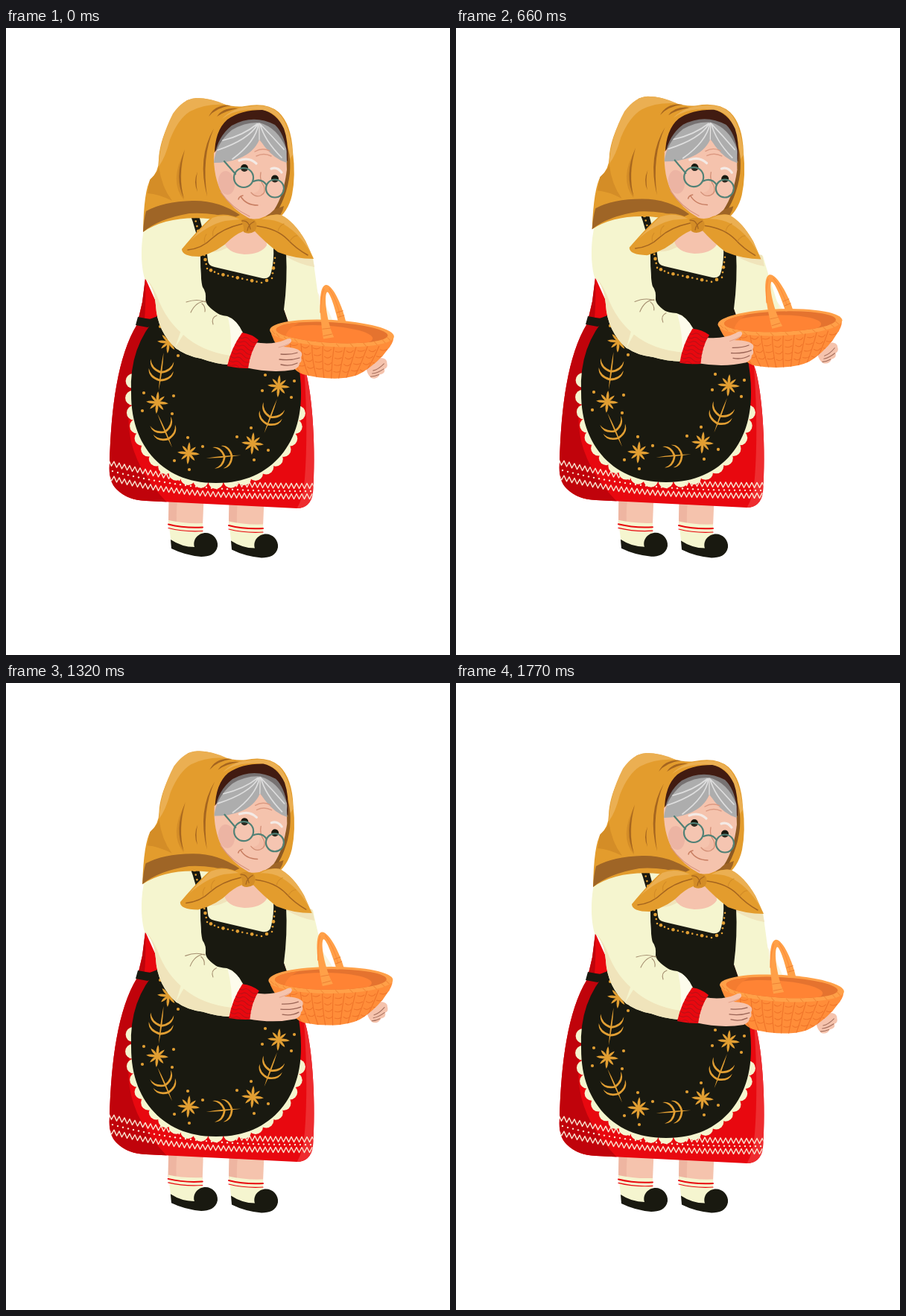
An HTML page with a canvas that plays this animation: 596x842 px, repeating every 1800 ms.

```html
<!DOCTYPE html>
<html lang="en">
<head>
<meta charset="utf-8">
<title>Grandmother with a basket</title>
<style>
html, body { margin: 0; width: 100%; height: 100%; overflow: hidden; background: #fff; }
canvas { display: block; width: 596px; height: 842px; }
</style>
</head>
<body>
<canvas id="stage" width="596" height="842"></canvas>
<script>
const ctx = document.getElementById('stage').getContext('2d');
const LOOP = 1800, STEP = 30, TAU = Math.PI * 2;
const C = {
  scarf: '#e39c2d', scarfLight: '#ebaf52', scarfShade: '#d48d27', brown: '#9f6526', fold: '#a5651f',
  skin: '#f5c3ad', skinShade: '#eeb5a1', cream: '#f5f5cf', creamShade: '#f0e4bb',
  black: '#191910', red: '#e8080f', darkRed: '#c0030b', gold: '#e29f33',
  wicker: '#ff8d39', rim: '#ffa048', weave: '#f0752a'
};
const cache = new Map();
function path(d) {
  if (!cache.has(d)) cache.set(d, new Path2D(d));
  return cache.get(d);
}
function fill(color, d) {
  ctx.fillStyle = color;
  ctx.fill(path(d));
}
function line(color, width, d) {
  ctx.strokeStyle = color;
  ctx.lineWidth = width;
  ctx.stroke(path(d));
}
function oval(color, x, y, rx, ry = rx, turn = 0) {
  ctx.fillStyle = color;
  ctx.beginPath();
  ctx.ellipse(x, y, rx, ry, turn, 0, TAU);
  ctx.fill();
}
function group(x, y, angle, draw, px = 0, py = 0) {
  ctx.save();
  ctx.translate(x + px, y + py);
  ctx.rotate(angle);
  ctx.translate(-px, -py);
  draw();
  ctx.restore();
}
function clip(d, draw) {
  ctx.save();
  ctx.clip(path(d));
  draw();
  ctx.restore();
}
const wave = (t, period) => (1 - Math.cos(TAU * t / period)) / 2;

function leg() {
  fill(C.skin, 'M219 620 H266 L264 668 L218 664 Z');
  fill(C.skinShade, 'M219 620 H232 Q228 645 229 664 L218 664 Z');
  fill(C.cream, 'M218 661 Q240 666 264 665 L264 690 L254 700 L222 694 Z');
  line(C.red, 2, 'M218 666.5 Q240 672 264 670.5');
  line(C.red, 1.2, 'M218 671.5 Q240 677 264 675.5');
  fill(C.black, 'M221 687 Q236 697 253 697 C250 687 258 678 268 678 C277 678 285 686 284 696 C282 707 272 710 262 710 Q240 708 222 699 Z');
}

const SKIRT = 'M187 336 L183 368 L176 398 C150 440 141 510 139 585 Q137 609 149 620 Q163 634 188 635 L390 645 Q409 645 412 624 C416 570 412 495 402 460 L372 376 L205 376 Z';

function zigzag(base, rise, power) {
  ctx.beginPath();
  for (let i = 0; i <= 79; i++) {
    const x = 138 + i * 3.5;
    const u = Math.max(0, 413 - x) / 274;
    ctx.lineTo(x, base - rise * u ** power + (i % 2 ? 3.5 : -3.5));
  }
  ctx.strokeStyle = '#f9e6d2';
  ctx.lineWidth = 1.4;
  ctx.stroke();
}

function skirt() {
  fill(C.red, SKIRT);
  clip(SKIRT, () => {
    fill(C.darkRed, 'M187 336 Q188 370 186 390 L210 390 L176 460 Q160 500 166 545 Q173 592 216 637 H130 V380 Z');
    fill('#ee2c2f', 'M400 455 Q406 540 401 605 Q399 632 390 646 H420 V455 Z');
    zigzag(615, 31, 2.5);
    zigzag(629, 25, 3);
    for (let x = 143; x < 412; x += 7) {
      const u = (413 - x) / 274;
      oval('#f9e6d2', x, 622 - 28 * u ** 2.7, 1.2);
    }
  });
  fill(C.black, 'M177 388 L193 391 L206 386 L210 394 L190 402 L174 399 Z');
}

// Rounded hem of the apron, a in radians
function hem(a, grow = 0) {
  const bend = v => Math.sign(v) * Math.abs(v) ** 0.91;
  return [282 + (114 + grow) * bend(Math.cos(a)), 490 + (121 + grow) * bend(Math.sin(a))];
}

function star(x, y) {
  for (let i = 0; i < 8; i++) {
    group(x, y, 0.08 + i * TAU / 8, () =>
      fill(C.gold, i % 2 ? 'M0 -1 Q8 -2.6 13 0 Q8 2.6 0 1 Z' : 'M0 -1 Q9 -3.2 15 0 Q9 3.2 0 1 Z'));
  }
}

function branch(x, y, angle, size) {
  group(x, y, angle, () => {
    ctx.scale(size, size);
    fill(C.gold, 'M0 26 Q-1.6 0 0.5 -26 Q2.6 0 0 26');
    for (const side of [-1, 1]) {
      ctx.save();
      ctx.scale(side, 1);
      fill(C.gold, 'M0 0 Q13 -3 16 -15 Q17 -1 0 3 Z M0 11 Q13 9 17 -2 Q17 11 0 14 Z');
      ctx.restore();
    }
  });
}

function beads(points) {
  let n = 0;
  for (let i = 1; i < points.length; i++) {
    const [ax, ay] = points[i - 1], [bx, by] = points[i];
    const count = Math.max(1, Math.round(Math.hypot(bx - ax, by - ay) / 6.5));
    for (let k = 0; k < count; k++) {
      const u = k / count;
      oval(C.gold, ax + (bx - ax) * u, ay + (by - ay) * u, n++ % 3 ? 1.3 : 2.3);
    }
  }
}

function dress() {
  for (let i = 0; i < 21; i++) {
    const [x, y] = hem(0.2 + i * (Math.PI - 0.09) / 20, -2);
    oval(C.cream, x, y, 10);
  }
  ctx.fillStyle = C.black;
  ctx.beginPath();
  ctx.moveTo(246, 249);
  ctx.lineTo(340, 270);
  ctx.lineTo(376, 302);
  ctx.quadraticCurveTo(378, 340, 373, 378);
  ctx.quadraticCurveTo(396, 442, 396, 490);
  for (let i = 0; i <= 60; i++) ctx.lineTo(...hem(Math.PI * i / 60));
  ctx.quadraticCurveTo(165, 428, 204, 386);
  ctx.lineTo(262, 350);
  ctx.quadraticCurveTo(262, 290, 246, 249);
  ctx.fill();

  star(218, 422);
  star(203, 503);
  star(245, 571);
  star(331, 558);
  star(366, 481);
  branch(208, 461, 0.12, 0.98);
  branch(213, 541, -0.42, 0.95);
  branch(292, 576, -1.67, 0.9);
  branch(355, 521, 0.35, 0.95);
  for (const [x, y] of [[207, 401], [231, 440], [185, 490], [225, 494], [183, 514], [223, 518],
    [244, 550], [264, 562], [226, 581], [246, 593], [310, 549], [329, 537], [352, 567],
    [333, 580], [348, 466], [387, 474], [383, 496], [344, 487]]) oval(C.gold, x, y, 2.1);

  fill(C.cream, 'M258 248 Q268 284 271 312 Q271 319 280 321 L344 336 Q354 338 356 328 Q360 312 359 294 L345 252 Z');
  fill(C.creamShade, 'M268 300 Q284 304 302 292 L318 272 L262 270 Z');
  fill(C.skin, 'M304 245 L348 250 L350 292 Q342 304 320 304 Q296 302 293 287 Z');
  beads([[253, 253], [265, 299], [270, 323], [285, 330], [343, 342], [357, 336], [362, 302]]);
}

function rearSleeve(p) {
  const x = 425 + 13 * p, y = 400 - 20 * p;
  fill('#faf5df', `M415 350 Q430 ${372 - 8 * p} 440 ${396 - 18 * p} L415 ${400 - 18 * p} Z`);
  fill(C.cream, `M360 298 L412 307 Q${417 + 2 * p} ${348 - 20 * p} ${x} ${y} L374 402 Z`);
  fill(C.creamShade, 'M374 298 L411 306 L414 321 Q395 318 376 307 Z');
}

function upperSleeve() {
  fill(C.cream, 'M187 262 C180 290 181 318 186 336 Q199 348 201 372 Q203 408 229 431 L258 440 L292 388 Q269 375 268 366 Q269 354 264 348 Q261 340 261 304 Q256 272 246 247 Z');
  fill(C.creamShade, 'M187 336 Q194 341 202 358 Q215 396 244 416 L260 440 L229 431 Q203 408 201 372 Q199 348 187 336 Z');
}

function forearm() {
  fill(C.cream, 'M244 380 Q258 372 269 374 Q276 384 297 387 Q309 391 318 409 L299 452 Q281 451 262 444 Q240 440 227 429 Z');
  fill(C.creamShade, 'M227 429 L238 412 Q262 434 301 440 L299 452 Q281 451 262 444 Q240 440 227 429 Z');
  fill('#fdfcec', 'M298 388 Q312 394 317 409 L301 443 Q304 415 298 388 Z');
  line('#a58f70', 1.1, 'M242 368 Q257 363 268 368 M248 382 Q255 367 268 367 M263 370 Q268 374 267 381 M278 398 Q275 389 283 386');
  fill(C.skin, 'M333 422 Q358 426 374 419 Q384 414 383 421 Q380 426 372 428 Q390 429 395 434 Q399 437 396 442 Q398 447 394 450 Q394 456 386 459 Q356 464 322 456 Z');
  line('#9a6455', 1.3, 'M369 438 Q382 439 391 436 M367 445 Q382 447 394 443 M369 452 Q381 455 391 450');
  line('#e2a38d', 1, 'M366 429 Q374 427 380 424');
  const cuff = 'M317 409 Q330 411 339 419 Q328 434 325 457 Q310 457 297 454 Q302 430 317 409 Z';
  fill(C.red, cuff);
  clip(cuff, () => {
    for (let i = 0; i < 8; i++) {
      const y = 414 + i * 5.3, x = 311 - i * 2;
      line('#bd1016', 1.1, `M${x} ${y} q4 4 8 2 t8 3 t10 3`);
    }
  });
}

function basket() {
  fill(C.skin, 'M58 30 Q76 27 76 36 Q78 42 73 44 Q75 50 67 52 Q64 59 56 57 Q50 53 48 42 Z');
  line('#a56f5d', 1.1, 'M58 47 Q65 45 72 37 M57 51 Q64 50 72 44 M55 55 Q60 55 66 52');
  const body = 'M-83 -1 Q-80 14 -66 28 Q-51 53 -36 57 Q-12 62 12 60 Q33 58 44 50 Q66 34 75 19 Q83 9 83 1 Z';
  fill(C.wicker, body);
  clip(body, () => {
    for (let i = -4; i <= 5; i++) {
      const x = i * 15 + 4;
      line(C.weave, 1.2, `M${x} 14 Q${x * 0.9 - 2} 38 ${x * 0.64} 62`);
      for (let k = 0; k < 4; k++) {
        const y = 24 + k * 9 - Math.abs(i) * 1.4;
        line(C.weave, 1.1, `M${x * (1 - k * 0.07) + 2} ${y} q5 ${i % 2 ? 4 : 2} 9 -1`);
      }
    }
  });
  oval(C.rim, 0, 0, 83.5, 18);
  const inside = 'M-75 -1 A75 13.8 0 0 1 75 -1 A75 13.8 0 0 1 -75 -1 Z';
  fill('#e5732f', inside);
  clip(inside, () => {
    oval('#ff8334', -10, 4, 65, 14);
    fill('#f47c30', 'M-76 -1 Q-68 -12 -35 -16 Q-64 -4 -62 12 Z');
  });
  for (let i = 0; i < 12; i++) {
    const a = 0.2 + i * 0.25;
    const x = 79 * Math.cos(a), y = 15.8 * Math.sin(a);
    line('#f38a38', 1, `M${x - 3} ${y - 2} q2 2 4 4`);
  }
  fill(C.rim, 'M-11 8 C-17 -20 -23 -61 -12 -64.5 C-2 -66 13 -35 18 -16 L8 -14.5 C1 -38 -6 -55 -9.5 -55 C-14 -50 -8 -16 3 5 Z');
  line(C.wicker, 1.2, 'M-17 -27 Q-18 -45 -14 -59 M-7 -60 Q4 -45 10 -23');
  line('#ed8135', 1, 'M-11 4 l11 -3 M-13 -5 l11 -2 M7 -22 l8 -3 M5 -28 l8 -3');
}

function face() {
  fill(C.skin, 'M279 168 Q278 200 290 222 Q304 244 327 256 Q346 259 360 244 Q373 224 377 190 L376 162 L340 140 L290 156 Z');
  line('#d9957e', 1.2, 'M288 220 Q303 242 327 253');
  oval('#ecb4a3', 296, 208, 11, 16, -0.15);
  fill('#adadad', 'M279 181 Q281 156 303 137 Q321 126 340 127 Q365 134 376 162 L377 181 Q360 176 347 159 Q342 152 340 150 Q333 167 313 175 Q298 181 279 181 Z');
  line('#dedede', 1.7, 'M339 129 Q335 153 304 176 M338 129 Q326 150 284 164 M337 129 Q319 144 291 151 M341 129 Q347 151 370 174 M342 130 Q357 145 373 163');
  line('#e7e5e3', 1.2, 'M340 128 V150');
  line('#dc9a82', 1.4, 'M334 166 Q344 160 354 165 M336 172 Q346 167 356 172');
  line('#f4eae5', 3.2, 'M313 178 Q326 173 336 182 M356 189 Q364 186 370 194');
  oval(C.black, 320, 188, 5);
  oval(C.black, 361, 202.5, 5);
  fill('#f2bba5', 'M340 208 Q348 216 347 222 Q342 229 330 222 Q343 221 340 208 Z');
  line('#d28f76', 1.3, 'M342 194 Q340 204 346 212 Q350 221 342 225 Q335 228 329 221');
  line('#c77d61', 1.5, 'M315 226 Q322 238 338 238 M312 230 Q313 226 318 225');
  for (const [x, y, r] of [[319, 201, 13], [361, 215.5, 12]]) {
    oval('rgba(255,235,225,.08)', x, y, r);
    ctx.strokeStyle = '#518176';
    ctx.lineWidth = 2.2;
    ctx.stroke();
  }
  line('#518176', 2.2, 'M293 179 L308 196 M332 206 Q343 201 350 211');
}

function head() {
  fill(C.scarf, 'M184 274 Q185 218 194 203 Q205 193 205 177 C206 149 223 112 243 97 Q262 90 288 101 Q307 107 320 105 Q350 99 366 113 Q383 129 385 166 Q389 198 384 224 Q379 247 361 260 L300 260 Q225 246 184 274 Z');
  fill(C.scarfLight, 'M205 186 Q206 150 224 115 Q238 95 255 94 Q276 94 295 103 Q268 101 247 112 Q231 122 220 150 Q214 174 205 186 Z');
  fill(C.scarfShade, 'M193 204 Q205 193 205 186 Q209 214 223 232 Q205 223 190 222 Z');
  fill(C.scarfShade, 'M240 165 Q218 206 239 231 Q231 202 240 165 Z');
  fill(C.fold, 'M240 163 Q225 201 239 229 Q230 199 240 163 Z M279 135 Q256 174 270 226 Q262 174 279 135 Z M272 119 Q280 102 302 104 Q282 107 272 119 Z M283 119 Q291 106 312 108 Q294 111 283 119 Z M257 193 Q251 207 257 220 Q254 206 257 193 Z');
  fill(C.brown, 'M184 274 Q185 257 188 246 Q211 233 250 232 Q285 231 314 251 L304 256 Q276 247 246 249 Q205 256 184 274 Z');
  fill(C.scarfLight, 'M290 122 Q305 106 330 105 Q356 101 369 118 Q382 136 385 170 L381 176 Q378 139 363 119 Q350 107 323 110 Q305 111 290 122 Z');
  fill('#8d5922', 'M374 150 Q383 167 381 195 Q377 229 358 256 L348 250 L370 215 Z');
  fill(C.brown, 'M360 244 L373 239 Q371 252 359 260 L347 253 Z');
  fill('#411b11', 'M280 171 Q280 138 297 123 Q315 110 344 110 Q363 114 373 135 Q379 151 378 179 L370 170 L335 130 Z');
  fill('#777272', 'M280 172 Q284 146 303 131 Q332 115 361 130 Q373 141 377 166 L376 178 L335 140 L284 172 Z');
  face();
}

function bow() {
  fill(C.scarf, 'M321 259 Q294 245 276 254 Q260 268 236 297 Q236 307 260 307 Q286 300 302 283 Q313 274 322 272 Z');
  fill(C.scarfLight, 'M314 257 Q294 248 277 255 Q263 268 248 285 Q272 264 294 259 Z');
  fill(C.scarf, 'M333 261 Q352 248 369 251 Q387 260 402 286 L413 310 Q388 310 365 301 Q347 287 333 272 Z');
  fill(C.scarfLight, 'M343 257 Q357 249 369 251 Q387 260 402 286 L413 310 Q398 278 372 263 Q359 256 343 257 Z');
  line(C.fold, 1.5, 'M317 263 Q291 269 276 283 Q263 296 244 298 M337 266 Q363 269 378 284 Q389 296 405 305');
  line(C.scarfShade, 1.2, 'M278 280 Q276 272 282 267 M267 289 Q265 282 269 277 M365 273 Q367 265 373 263 M381 286 Q387 278 391 279');
  fill(C.scarfShade, 'M315 258 Q325 253 334 258 Q339 265 334 273 Q326 278 319 274 Q320 265 315 258 Z');
  line(C.fold, 1.3, 'M317 259 Q326 258 328 270 M333 260 Q325 264 324 272');
}

function draw(t) {
  const p = wave(t, LOOP);
  const bob = 2 * wave(t, LOOP / 2);
  const tap = wave(t, LOOP / 3);
  ctx.fillStyle = '#fff';
  ctx.fillRect(0, 0, 596, 842);
  ctx.lineCap = ctx.lineJoin = 'round';
  group(81, 1.5, 0, leg);
  group(-0.3 * tap, -1.9 * tap, -0.025 * tap, leg, 222, 690);
  group(0, -bob, 0, () => {
    rearSleeve(p);
    skirt();
    dress();
    upperSleeve();
    group(437.5 - 3 * p, 410 - 16.3 * p, 0.055 - 0.108 * p, basket);
    group(0, 0, -0.075 * p, forearm, 250, 400);
    group(0, 0, 0.026 * p, head, 310, 210);
    group(-3.4 * p, 0.4 * p, 0.018 * p, bow, 326, 265);
  });
}

function tick(now) {
  draw(Math.floor(now % LOOP / STEP) * STEP);
  requestAnimationFrame(tick);
}
draw(0);
requestAnimationFrame(tick);
</script>
</body>
</html>
```
